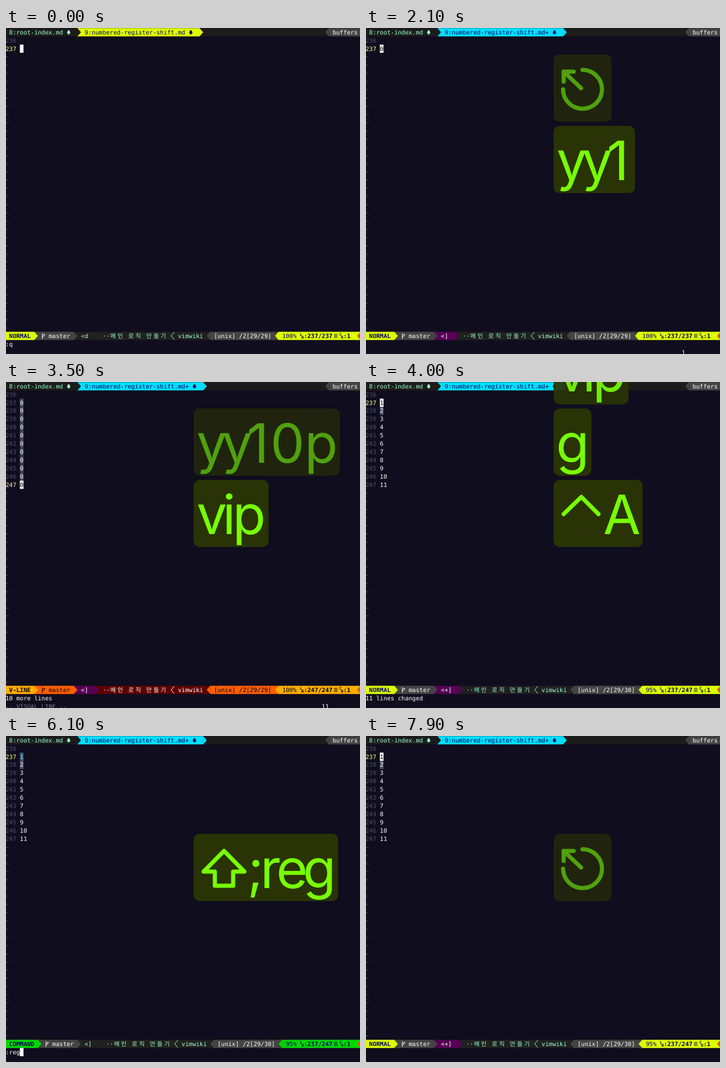
These frames come from a looping animation (600 px wide and 553 px high, 8 s). An HTML page:

```html
<!DOCTYPE html>
<html lang="en">
<head>
<meta charset="utf-8">
<title>Editor session</title>
<style>
  html, body { margin: 0; width: 100%; height: 100%; overflow: hidden; background: #100d1e; }
  svg { display: block; width: 100%; height: 100%; }
  text { white-space: pre; text-rendering: geometricPrecision; }
  .cell { font: 10.12px "DejaVu Sans Mono", "Noto Sans CJK KR", "Noto Sans CJK", monospace; }
  .bold { font-weight: 700; }
  .mini { font: 700 6.5px "DejaVu Sans Mono", monospace; }
  .key { font: 92px Inter, sans-serif; fill: #78fe04; }
  .icon { fill: none; stroke: #78fe04; stroke-width: 7; stroke-linecap: round; stroke-linejoin: round; }
</style>
</head>
<body>
<svg id="stage" viewBox="0 0 600 553" preserveAspectRatio="none"></svg>
<script>
const LOOP = 8000, STEP = 100;
const CELL = 6.09, LEFT = -0.8, ROW = 13.92, TOP = 0.3;
const FADE_DELAY = 750, FADE_TIME = 650;
const NAVY = '#00005f', WHITE = '#ffffff', MINT = '#9cffd3';
const stage = document.getElementById('stage');

// Status colours: a = outer sections, b = inner sections, c = middle.
const dark = { b: '#444444', bText: WHITE, c: '#202020', cText: MINT, number: '#ffff87' };
const palettes = {
  NORMAL: { ...dark, a: '#dfff00', aText: NAVY },
  COMMAND: { ...dark, a: '#00d700', aText: NAVY },
  INSERT: { ...dark, a: '#00dfff', aText: NAVY, b: '#005fff', c: '#000080', cText: WHITE },
  VISUAL: { a: '#ffaf00', aText: '#000', b: '#ff5f00', bText: '#000', c: '#5f0000', cText: WHITE, number: '#ffdfb8' },
};
palettes['V-LINE'] = palettes.VISUAL;

const marks = {
  word: { bg: '#3a5875', fg: '#a6d5f5' },
  select: { bg: '#45455e', fg: WHITE },
  match: { bg: '#50506a', fg: WHITE },
};
const zeros = Array(11).fill('0');
const counted = zeros.map((_, i) => String(i + 1));
const all = mark => zeros.map(() => mark);

// Each entry changes part of the editor state from its time on.
const timeline = [
  [0, { mode: 'NORMAL', lines: [''], line: 0, cursor: [2, 4], marks: [], modified: false,
        path: '<d', percent: '100%', total: 29, message: ':q', note: '', pending: '' }],
  [300, { mode: 'INSERT', message: '', note: '-- INSERT --' }],
  [600, { lines: ['0'], modified: true, path: '<]', cursor: [2, 5] }],
  [1100, { mode: 'NORMAL', note: '', cursor: [2, 4] }],
  [1700, { pending: 'y' }],
  [1900, { pending: '' }],
  [2100, { pending: '1' }],
  [2300, { pending: '10' }],
  [2500, { pending: '', lines: zeros, line: 1, cursor: [3, 4], marks: all('word'),
           path: '<+]', percent: '96%', message: '10 more lines' }],
  [3000, { mode: 'VISUAL', note: '-- VISUAL --', pending: '1', marks: [] }],
  [3100, { pending: 'i' }],
  [3200, { mode: 'V-LINE', note: '-- VISUAL LINE --', pending: '11', line: 10, cursor: [12, 4],
           marks: all('select'), path: '<]', percent: '100%' }],
  [3700, { pending: 'g' }],
  [3900, { mode: 'NORMAL', note: '', pending: '', lines: counted, line: 0, cursor: [2, 4],
           marks: [, 'match'], path: '<+]', percent: '95%', total: 30, message: '11 lines changed' }],
  [5600, { mode: 'COMMAND', message: ':', cursor: [38, 1], marks: ['word', 'match'], path: '<]' }],
  [5800, { message: ':r', cursor: [38, 2] }],
  [5900, { message: ':re', cursor: [38, 3] }],
  [6000, { message: ':reg', cursor: [38, 4] }],
  [6900, { mode: 'NORMAL', message: '', cursor: [2, 4], marks: [, 'match'], path: '<+]' }],
];

// Key caster rows: final width, then [time, key, x in the box].
const keyRows = [
  { width: 88, keys: [[300, 'i', 5], [600, '0', 23]] },
  { width: 98, keys: [[1100, 'esc', 0]] },
  { width: 248, keys: [[1700, 'y', 5], [1900, 'y', 48], [2100, '1', 90], [2300, '0', 130], [2500, 'p', 188]] },
  { width: 127, keys: [[3000, 'v', 5], [3100, 'i', 49], [3200, 'p', 66]] },
  { width: 64, keys: [[3700, 'g', 4]] },
  { width: 151, keys: [[3900, 'ctrl', 0], [3900, 'A', 84]] },
  { width: 245, keys: [[5600, 'shift', 0], [5600, ';', 91], [5800, 'r', 113], [5900, 'e', 140], [6000, 'g', 185]] },
  { width: 98, keys: [[6900, 'esc', 0]] },
];
const icons = {
  esc: 'M49 26A33 33 0 1 1 16 59M46.5 57L17 29M17 46V29H34',
  ctrl: 'M17 58L47 29L76 58',
  shift: 'M51.5 29L86 64H67V88H36V64H17Z',
};

const colX = col => LEFT + col * CELL;
const rowY = row => TOP + row * ROW;
const escapeText = s => s.replace(/&/g, '&amp;').replace(/</g, '&lt;');
const isWide = ch => /[가-힣]/.test(ch);

function block(col, row, cols, fill) {
  return `<rect x="${colX(col)}" y="${rowY(row)}" width="${cols * CELL}" height="${ROW}" fill="${fill}"/>`;
}

function write(col, row, string, fill = WHITE, style = '') {
  const xs = [];
  for (const ch of string) {
    xs.push((colX(col) + (isWide(ch) ? 1 : 0)).toFixed(2));
    col += isWide(ch) ? 2 : 1;
  }
  return `<text class="cell ${style}" x="${xs.join(' ')}" y="${rowY(row) + 10.4}" fill="${fill}">${escapeText(string)}</text>`;
}

function wedge(col, row, fill, toRight) {
  const x0 = colX(toRight ? col : col + 1), x1 = colX(toRight ? col + 1 : col), y = rowY(row);
  return `<path d="M${x0} ${y}L${x1} ${y + ROW / 2}L${x0} ${y + ROW}Z" fill="${fill}"/>`;
}

function shape(col, row, d, color, filled) {
  const paint = filled ? `fill="${color}"` : `fill="none" stroke="${color}"`;
  return `<path transform="translate(${colX(col)} ${rowY(row)})" d="${d}" ${paint}/>`;
}

function miniPair(col, letter, color) {
  const x = colX(col), y = rowY(37);
  return `<text class="mini" fill="${color}" x="${x - 0.5}" y="${y + 6.8}">${letter}</text>` +
         `<text class="mini" fill="${color}" x="${x + 2.2}" y="${y + 11.8}">N</text>`;
}

function drawTabs(s) {
  const color = s.modified ? '#00dfff' : '#dfff00';
  const name = '9:numbered-register-shift.md' + (s.modified ? '+' : '');
  const end = 22 + name.length + 4;
  const arrow = 'M1.6 4H5.4V7.2H7.2L3.5 10.9L-.2 7.2H1.6Z';
  return block(0, 0, 100, '#1c1c1c') +
    write(1, 0, '8:root-index.md', MINT) + shape(17, 0, arrow, MINT, true) +
    block(20, 0, end - 20, color) + wedge(20, 0, '#1c1c1c', true) +
    write(22, 0, name, NAVY) + shape(end - 3, 0, arrow, NAVY, true) +
    wedge(end, 0, color, true) +
    wedge(89, 0, '#444444', false) + block(90, 0, 10, '#444444') + write(91, 0, 'buffers');
}

function drawLines(s) {
  let out = write(0, 1, '236', '#505068');
  s.lines.forEach((content, i) => {
    const mark = marks[s.marks[i]];
    if (mark) out += block(4, i + 2, content.length, mark.bg);
    out += write(0, i + 2, String(237 + i), i === s.line ? palettes[s.mode].number : '#505068');
    out += write(4, i + 2, content, mark ? mark.fg : WHITE);
  });
  for (let row = s.lines.length + 2; row < 37; row++) out += write(0, row, '~', '#50506c');
  return out;
}

function drawStatus(s) {
  const p = palettes[s.mode], row = 37;
  const left = s.mode.length - 6;
  const right = 4 - s.percent.length;
  const flagged = s.modified && s.mode !== 'COMMAND';
  const last = 236 + s.lines.length;
  const position = `:${237 + s.line}/${last}`;
  let out = block(0, row, 100, p.c);
  if (flagged) {
    out += block(19, row, 6 + right, '#560056') + wedge(25 + right, row, '#560056', true);
  }
  out += block(8 + left, row, 11, p.b) + wedge(19 + left, row, p.b, true) +
    block(0, row, 8 + left, p.a) + wedge(8 + left, row, p.a, true) +
    write(1, row, s.mode, p.aText, 'bold') +
    shape(10 + left, row, 'M1.5 2.5V12M1.5 8.5Q4.8 8 4.8 4.5M3.3 5.5L4.8 3.8L6 5.5', p.bText) +
    write(12 + left, row, 'master', p.bText) +
    write(21 + left, row, s.path, flagged ? WHITE : p.cText);

  out += write(27 + right, row, '··메인 로직 만들기', p.cText) +
    shape(46 + right, row, 'M5.8 .7L.5 7L5.8 13.2', p.cText) +
    write(48 + right, row, 'vimwiki', p.cText) +
    wedge(56 + right, row, p.b, false) + block(57 + right, row, 19, p.b) +
    write(58 + right, row, `[unix] /2[29/${s.total}]`, p.bText) +
    wedge(75 + right, row, p.a, false) + block(76 + right, row, 24, p.a) +
    write(77 + right, row, s.percent, p.aText) +
    miniPair(82, 'L', p.aText) + write(83, row, position, p.aText, 'bold') +
    shape(91, row, 'M2.5 4.5H8.5M2.5 7H8.5M2.5 9.5H8.5', p.aText) +
    miniPair(93, 'C', p.aText) + write(94, row, ':1', p.aText, 'bold') +
    wedge(97.8, row, '#df5f00', false);
  return out;
}

function drawCursor(s) {
  const [row, col] = s.cursor;
  const under = row < 37 ? (s.lines[row - 2] || '')[col - 4] || '' : '';
  return block(col, row, 1, WHITE) + write(col, row, under, '#000');
}

function drawKeys(t) {
  const started = keyRows.filter(r => r.keys[0][0] <= t);
  return started.map((r, i) => {
    const shown = r.keys.filter(k => k[0] <= t);
    const lastPress = shown[shown.length - 1][0];
    const opacity = Math.min(1, 1 - (t - lastPress - FADE_DELAY) / FADE_TIME);
    if (opacity <= 0) return '';
    const next = r.keys[shown.length];
    const width = next ? next[2] + 8 : r.width;
    const y = 166 - 121 * (started.length - 1 - i);
    const glyphs = shown.map(([, key, x]) => icons[key]
      ? `<path class="icon" d="${icons[key]}"/>`
      : `<text class="key" x="${x}" y="92">${key}</text>`).join('');
    return `<g transform="translate(318 ${y})" opacity="${opacity}">` +
      `<rect width="${width}" height="114" rx="10" fill="#2a3305"/>${glyphs}</g>`;
  }).join('');
}

function draw(t) {
  const s = Object.assign({}, ...timeline.filter(([at]) => at <= t).map(([, change]) => change));
  stage.innerHTML = '<rect width="600" height="553" fill="#100d1e"/>' +
    drawTabs(s) + drawLines(s) + drawStatus(s) +
    write(0, 38, s.message) + write(0, 39, s.note, '#77778a') + write(88, 39, s.pending) +
    drawCursor(s) + drawKeys(t);
}

const start = performance.now();
let shownStep = -1;
function tick() {
  const t = (performance.now() - start) % LOOP;
  const step = Math.floor(t / STEP);
  if (step !== shownStep) draw((shownStep = step) * STEP);
  requestAnimationFrame(tick);
}
tick();
</script>
</body>
</html>
```
